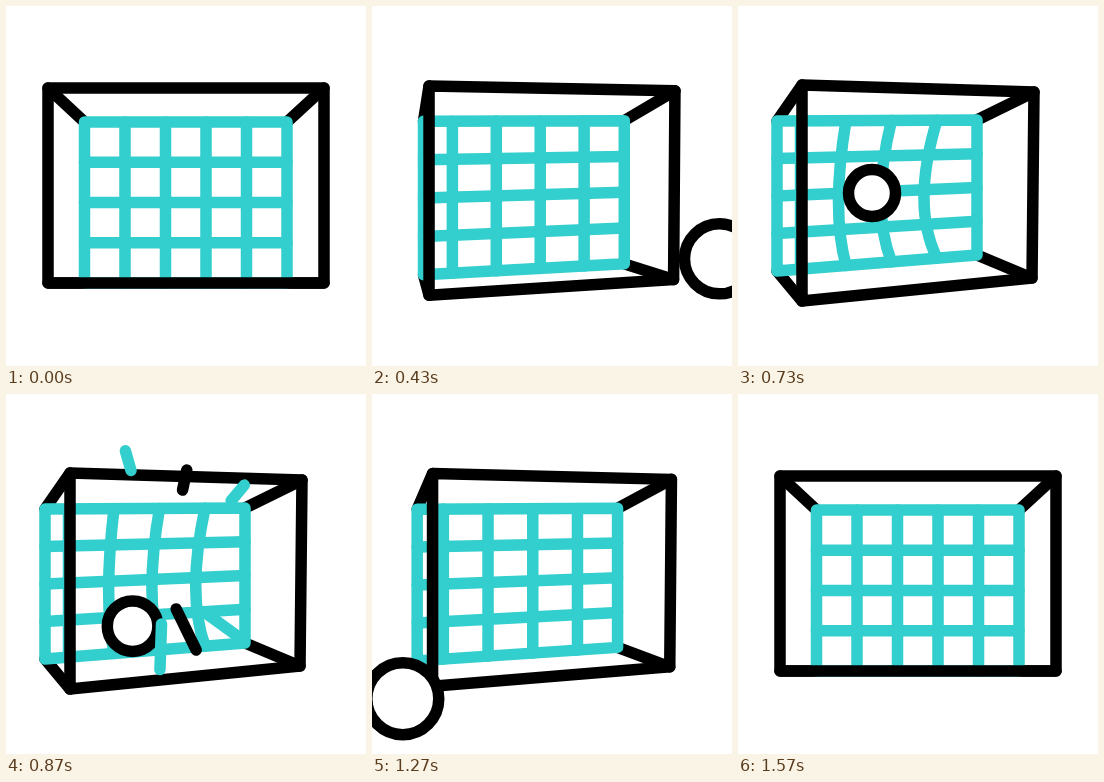
These frames come from a looping animation (360 by 360 pixels, 1670 ms). An HTML page with a canvas:

```html
<!DOCTYPE html>
<html lang="en">
<head>
<meta charset="utf-8">
<title>Goal</title>
<style>
  html, body { margin: 0; height: 100%; overflow: hidden; background: #fff; }
  canvas { display: block; width: 100vw; height: 100vh; }
</style>
</head>
<body>
<canvas width="360" height="360"></canvas>
<script>
const ctx = document.querySelector('canvas').getContext('2d');
const BLACK = '#000', TEAL = '#33cece';
const LOOP = 1670, STEP = 100 / 3;

const mix = (a, b, k) => a + (b - a) * k;
const mixPoint = (a, b, k) => [mix(a[0], b[0], k), mix(a[1], b[1], k)];
const ramp = (v, from, to) => Math.min(1, Math.max(0, (v - from) / (to - from)));
const smooth = u => u * u * (3 - 2 * u);

function line(color, points, closed) {
  ctx.strokeStyle = color;
  ctx.beginPath();
  points.forEach(p => ctx.lineTo(...p));
  if (closed) ctx.closePath();
  ctx.stroke();
}

// Corners clockwise from top left, turned from facing straight to facing aside
const frontStraight = [[42, 82], [318, 82], [318, 277], [42, 277]];
const frontAside = [[64, 79], [296, 86], [294, 272], [64, 295]];
const backStraight = [[78.5, 116], [281, 116], [281, 277], [78.5, 277]];
const backAside = [[39, 115], [239, 114], [239, 249], [39, 265]];

function drawGoal(turn, bulge) {
  const turned = (from, to) => from.map((p, i) => mixPoint(p, to[i], turn));
  const front = turned(frontStraight, frontAside);
  const back = turned(backStraight, backAside);
  const [tl, tr, br, bl] = back;

  front.forEach((p, i) => line(BLACK, [p, back[i]]));

  line(TEAL, back, true);
  for (let i = 1; i < 4; i++) {
    line(TEAL, [mixPoint(tl, bl, i / 4), mixPoint(tr, br, i / 4)]);
  }
  for (let i = 0; i < 4; i++) {
    const x = mix(119 + 40.5 * i, 62.5 + 45.5 * i, turn);
    const k = (x - tl[0]) / (tr[0] - tl[0]);
    const top = mixPoint(tl, tr, k), bottom = mixPoint(bl, br, k);
    const depth = 26 * Math.sqrt(i / 3) * bulge;
    ctx.beginPath();
    ctx.moveTo(...top);
    ctx.quadraticCurveTo(x - depth, mix(top[1], bottom[1], 0.62), ...bottom);
    ctx.stroke();
  }

  line(BLACK, front, true);
}

// Flies into the net, drops, then rolls out towards the viewer
function drawBall(step) {
  const ahead = 1 - ramp(step, 11, 20);
  const drop = smooth(ramp(step, 22, 30));
  const roll = ramp(step, 22, 46);
  const x = 134 + 274.5 * ahead - 223 * roll ** 1.9;
  const y = 187 + 96 * ahead ** 1.5 + 63 * drop + 82 * roll;
  const r = 23.5 + 14.8 * ahead + 22 * roll ** 1.4;
  ctx.fillStyle = '#fff';
  ctx.strokeStyle = BLACK;
  ctx.beginPath();
  ctx.arc(x, y, r, 0, 2 * Math.PI);
  ctx.fill();
  ctx.stroke();
}

// Two fans of three rays, short ones above and long ones below
function drawRays(step) {
  const head = smooth(ramp(step, 23, 30)), tail = ramp(step, 27, 37);
  if (head <= tail) return;
  for (const [firstAngle, length] of [[-106, 52], [36, 116]]) {
    [168, 146, 158].forEach((reach, i) => {
      const angle = (firstAngle + 28 * i) * Math.PI / 180;
      const at = k => {
        const d = reach - length * (1 - k);
        return [157 + d * Math.cos(angle), 188 + d * Math.sin(angle)];
      };
      line(i === 1 ? BLACK : TEAL, [at(tail), at(head)]);
    });
  }
}

function draw(now) {
  const step = Math.floor((now % LOOP + 3.4) / STEP);
  const turn = smooth(ramp(step, 3, 19)) - smooth(ramp(step, 35, 47));
  const bulge = ramp(step, 18, 21) * (1 - ramp(step, 22, 36));
  ctx.fillStyle = '#fff';
  ctx.fillRect(0, 0, 360, 360);
  ctx.lineWidth = 11.5;
  ctx.lineCap = ctx.lineJoin = 'round';
  drawGoal(turn, bulge);
  drawBall(step);
  drawRays(step);
}

const start = performance.now();
(function tick() {
  draw(performance.now() - start);
  requestAnimationFrame(tick);
})();
</script>
</body>
</html>
```
